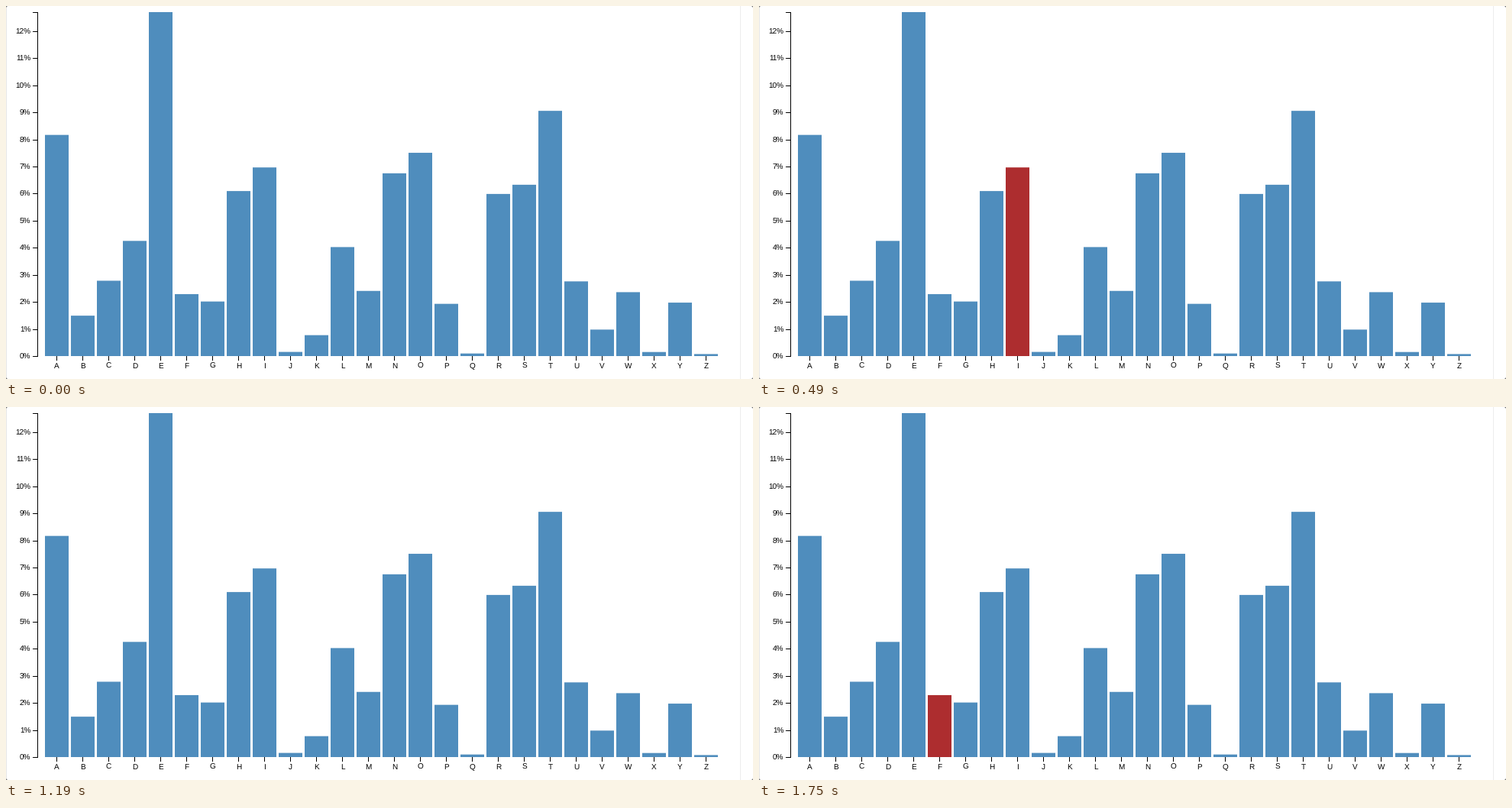
A matplotlib script that plays this animation: 978 px wide and 488 px high, repeating every 1820 ms.

```python
import matplotlib.pyplot as plt
from matplotlib.animation import FuncAnimation
from matplotlib.patches import Polygon, Rectangle

W, H, DPI = 978, 488, 64  # a power of two keeps the pixel size exact
STEP_MS, FRAMES = 70, 26
BLUE, RED = "#4f8dbd", "#ad2d2f"
BASE, PLOT_H = 458, 450
BAR_X, BAR_STEP, BAR_W = 51, 34, 31
LETTERS = "ABCDEFGHIJKLMNOPQRSTUVWXYZ"
PERCENT = [8.167, 1.492, 2.782, 4.253, 12.702, 2.288, 2.015, 6.094, 6.966,
           0.153, 0.772, 4.025, 2.406, 6.749, 7.507, 1.929, 0.095, 5.987,
           6.327, 9.056, 2.758, 0.978, 2.360, 0.150, 1.974, 0.074]
# Start time in ms and the bar under the pointer from then on
HOVER = [(0, ""), (350, "I"), (560, "H"), (1050, "G"), (1120, "F"),
         (1190, ""), (1260, "E"), (1680, ""), (1750, "F")]

plt.rcParams["font.family"] = "Liberation Sans"
plt.rcParams["text.hinting"] = "none"

fig = plt.figure(figsize=(W / DPI, H / DPI), dpi=DPI, facecolor="white")
ax = fig.add_axes([0, 0, 1, 1])
ax.set_xlim(0, W)
ax.set_ylim(H, 0)
ax.axis("off")


def rect(x, y, w, h, color, **kw):
    return ax.add_patch(Rectangle((x, y), w, h, facecolor=color, lw=0, **kw))


def label(x, y, text, ha):
    ax.text(x, y, text, ha=ha, va="baseline", color="black",
            fontsize=10 * 72 / DPI)


def y_of(percent):
    return BASE - PLOT_H * percent / max(PERCENT)


def draw_window():
    rect(0, 0, 1, H, "#e6e6e6")
    rect(961, 0, 1, H, "#ececec")
    for x, dx in ((0, 2), (W, -2)):
        for y, dy in ((0, 2), (H, -2)):
            ax.add_patch(Polygon([(x, y), (x + dx, y), (x, y + dy)],
                                 facecolor="#777777", lw=0))


def draw_axes():
    rect(41, 8, 1, BASE - 7, "black")
    rect(35, 8, 6, 1, "black")
    for n in range(13):
        y = round(y_of(n))
        rect(35, y, 6, 1, "black")
        label(32.3, y + 4, f"{n}%", "right")
    for i, letter in enumerate(LETTERS):
        x = BAR_X + i * BAR_STEP + BAR_W // 2
        rect(x, BASE, 1, 6, "black")
        label(x + 0.5, 474, letter, "center")


draw_window()
draw_axes()
bars = {}
for i, (letter, value) in enumerate(zip(LETTERS, PERCENT)):
    top = y_of(value)
    bars[letter] = rect(BAR_X + i * BAR_STEP, top, BAR_W, BASE - top, BLUE,
                        snap=False)


def update(frame):
    t = frame * STEP_MS
    active = [letter for start, letter in HOVER if start <= t][-1]
    for letter, bar in bars.items():
        bar.set_facecolor(RED if letter == active else BLUE)
    return list(bars.values())


anim = FuncAnimation(fig, update, frames=FRAMES, interval=STEP_MS,
                     repeat=True, repeat_delay=0, blit=False)
plt.show()
```
